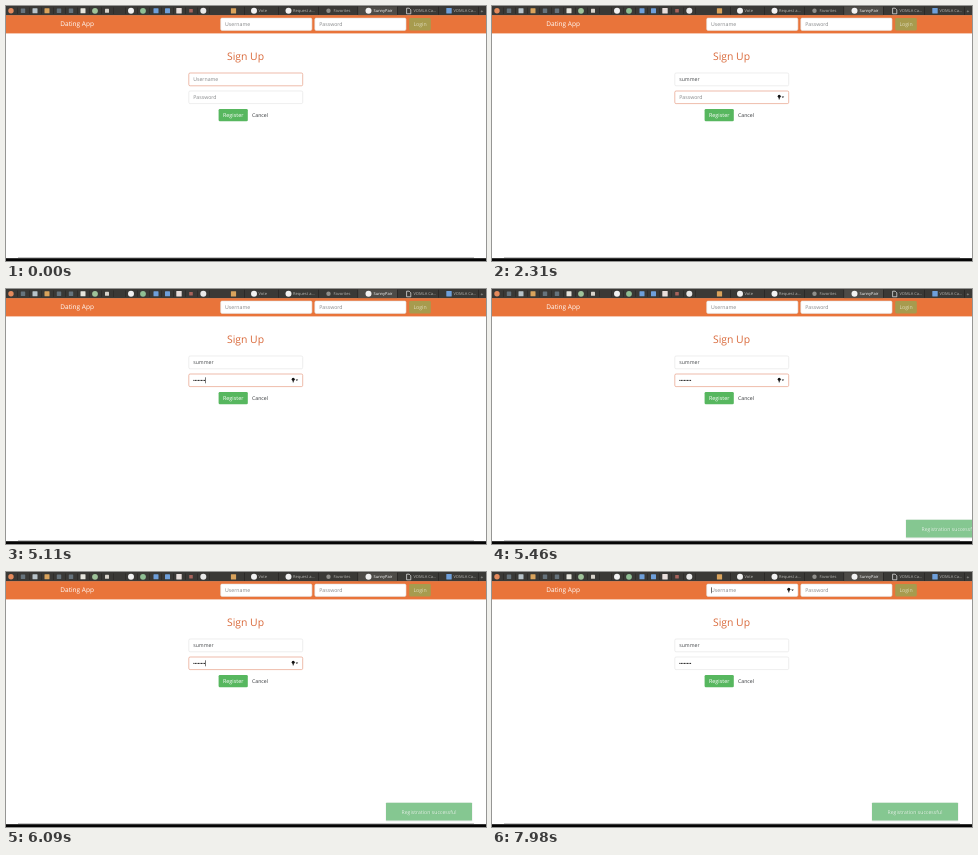
Animation, 480 px wide and 255 px high, one loop 8000 ms. Source, as an HTML page:

```html
<!DOCTYPE html>
<html lang="en">
<head>
<meta charset="utf-8">
<title>Sign Up</title>
<style>
  html, body { margin: 0; width: 100%; height: 100%; overflow: hidden; background: #fff; }
  svg { display: block; width: 480px; height: 255px; }
  text { font-family: "Open Sans", "Noto Sans", sans-serif; font-size: 5.2px; text-rendering: geometricPrecision; white-space: pre; }
  .hint { fill: #858789; }
  .typed { fill: #45484b; }
  .tab { font-size: 4px; fill: #b9b8b4; }
</style>
</head>
<body>
<svg id="stage" viewBox="0 0 480 255" xmlns="http://www.w3.org/2000/svg"></svg>
<script>
const NS = 'http://www.w3.org/2000/svg';
const stage = document.getElementById('stage');
const LOOP = 8000;

function add(tag, attrs, parent = stage) {
  const el = document.createElementNS(NS, tag);
  for (const k in attrs) el.setAttribute(k, attrs[k]);
  parent.appendChild(el);
  return el;
}
const rect = (x, y, width, height, fill, more = {}, parent) =>
  add('rect', { x, y, width, height, fill, ...more }, parent);
const circle = (cx, cy, r, fill, parent) => add('circle', { cx, cy, r, fill }, parent);
function label(x, y, str, attrs = {}, parent) {
  const el = add('text', { x, y, ...attrs }, parent);
  el.textContent = str;
  return el;
}
const show = (el, on) => el.setAttribute('visibility', on ? 'visible' : 'hidden');
const clamp = v => Math.max(0, Math.min(1, v));

function drawTabs() {
  rect(0, 0, 480, 9.6, '#3a3936');
  rect(352, 0.4, 39, 9.2, '#4d4b47');
  for (let x = 11.3; x < 206; x += 12) rect(x, 1.5, 0.5, 6.5, '#24231f');
  for (const x of [238, 272, 312, 351.5, 391, 432, 472]) rect(x, 0.8, 0.6, 8, '#22211e');

  const square = (x, fill, s = 5) => rect(x - s / 2, 4.8 - s / 2, s, s, fill, { rx: 0.5 });
  const disc = (x, fill, r = 2.9) => circle(x, 4.8, r, fill);
  disc(5, '#e58a5c', 2.7);
  for (const x of [17, 53, 65]) square(x, '#66737c', 4.4);
  square(29, '#b8c3c9');
  square(41, '#d9a35c');
  square(77, '#e6e5dd');
  disc(89, '#9fc39a');
  square(101, '#d8d3cb', 4);
  disc(125, '#f2f2f2', 3);
  disc(137, '#8fbf94');
  square(150, '#6e9fda');
  square(161.5, '#6e9fda');
  square(173, '#e8dfdc', 5.4);
  square(185, '#a8645c', 3.6);
  disc(197.3, '#e9e9e9', 3);
  square(227.5, '#d9a35c', 5.2);
  disc(248, '#f2f2f2', 3);
  disc(282.5, '#f2f2f2', 3);
  disc(322.5, '#8f8e8a', 2.2);
  disc(362.5, '#f2f2f2', 3);
  add('path', { d: 'M400.6 2.2h2.6l1.6 1.6v4h-4.2z', fill: 'none', stroke: '#eee', 'stroke-width': 0.7 });
  square(443, '#6e9fda', 5.4);

  const names = [[252.5, 'Vote'], [287, 'Request a…'], [327.5, 'Favorites'],
    [407.5, 'VOMLA Ca…'], [447.5, 'VOMLA Ca…']];
  for (const [x, str] of names) label(x, 6.3, str, { class: 'tab' });
  label(367.5, 6.3, 'SunnyPair', { class: 'tab', style: 'fill:#fff' });
  label(474.6, 6.6, '+', { class: 'tab', style: 'font-size:5px' });
}

function field(x, y, w, h, hint) {
  const box = rect(x, y, w, h, '#fff', { rx: 1.3, stroke: '#e3e3e3', 'stroke-width': 0.6 });
  const base = y + h / 2 + 1.85;
  return {
    box,
    hint: label(x + 4.4, base, hint, { class: 'hint' }),
    text: label(x + 4.4, base, '', { class: 'typed' }),
    caret: rect(x + 4.4, y + h / 2 - 3, 0.6, 6, '#222')
  };
}

// password-manager key with its drop-down arrow
function keyIcon(x, y) {
  const g = add('g', { transform: `translate(${x} ${y})` });
  circle(0, -0.8, 1.5, '#111', g);
  rect(-0.5, 0, 1, 2.4, '#111', {}, g);
  add('path', { d: 'M2.4 -.5h2.6l-1.3 1.4z', fill: '#222' }, g);
  return g;
}

drawTabs();
rect(0, 9.2, 480, 18.2, '#e9743a');
label(54.3, 20.4, 'Dating App', { fill: '#fff', style: 'font-size:6.5px;font-weight:500' });
const navUser = field(214.7, 12.1, 91.2, 12.3, 'Username');
const navPass = field(308.8, 12.1, 91.2, 12.3, 'Password');
show(navPass.caret, false);
rect(403.2, 12.1, 21.6, 12.3, '#a79b4e', { rx: 1.3 });
label(414, 20.2, 'Login', { fill: '#dfdcbd', 'text-anchor': 'middle' });

label(239.5, 53.7, 'Sign Up', { fill: '#d9693a', 'text-anchor': 'middle', style: 'font-size:10.4px' });
const user = field(182.8, 67, 113.9, 12.8, 'Username');
const pass = field(182.8, 85, 113.9, 12.6, 'Password');
const dots = Array.from({ length: 8 }, (_, i) => circle(187.9 + i * 1.52, 91.4, 0.62, '#333'));
rect(212.6, 103, 29.2, 12.2, '#57b75f', { rx: 1.3 });
label(227.2, 111.1, 'Register', { fill: '#fff', 'text-anchor': 'middle', style: 'font-size:5.4px;font-weight:500' });
label(246, 111.1, 'Cancel', { fill: '#34373a' });
const passKey = keyIcon(287.2, 91);
const navKey = keyIcon(296.8, 18);

const toast = add('g', {});
rect(379.6, 230.6, 87, 19, '#000', { opacity: 0.07, rx: 1 }, toast);
rect(380, 230.8, 86, 17.8, '#85c791', { rx: 0.6 }, toast);
label(423.4, 242.2, 'Registration successful', { fill: '#5c9d69', opacity: 0.5, 'text-anchor': 'middle' }, toast);
label(423, 241.8, 'Registration successful', { fill: '#e8f5ea', 'text-anchor': 'middle' }, toast);

rect(12, 251.2, 456, 0.8, '#b9b9b9');
rect(0, 252.2, 480, 2.8, '#050505');

const NAME = 'summer';
const nameKeys = [210, 350, 560, 700, 840, 1050];
const passKeys = dots.map((_, i) => 3850 + i * 140);
const PASS_FOCUS = 1820, NAV_FOCUS = 7630, TOAST = 5340;
const typedBy = (keys, t) => keys.filter(k => t >= k).length;
const within = (t, a, b) => t >= a && t < b;

function border(f, amount) {
  const mix = (a, b) => Math.round(a + (b - a) * amount);
  f.box.setAttribute('stroke', `rgb(${mix(227, 227)},${mix(227, 143)},${mix(227, 114)})`);
}

// cubic-bezier(.175, .885, .32, 1.275): overshoots, then settles
function backOut(x) {
  const curve = (s, a, b) => 3 * (1 - s) * (1 - s) * s * a + 3 * (1 - s) * s * s * b + s * s * s;
  let lo = 0, hi = 1;
  for (let i = 0; i < 24; i++) {
    const mid = (lo + hi) / 2;
    if (curve(mid, 0.175, 0.32) < x) lo = mid; else hi = mid;
  }
  return curve(hi, 0.885, 1.275);
}

function draw(t) {
  const inPass = clamp((t - PASS_FOCUS) / 150);
  const inNav = clamp((t - NAV_FOCUS) / 150);
  border(user, 1 - inPass);
  border(pass, inPass * (1 - inNav));

  const n = typedBy(nameKeys, t);
  user.text.textContent = NAME.slice(0, n);
  show(user.hint, n === 0);
  show(user.caret, within(t, 70, 1610));
  user.caret.setAttribute('x', 187.2 + (n ? user.text.getComputedTextLength() + 0.2 : 0));

  const p = typedBy(passKeys, t);
  dots.forEach((d, i) => show(d, i < p));
  show(pass.hint, p === 0);
  show(pass.caret, within(t, PASS_FOCUS, 2310) || within(t, 2870, 3360) ||
    within(t, 3850, 5390) || within(t, 5890, 6370) || within(t, 6870, 7370));
  pass.caret.setAttribute('x', 187.2 + p * 1.52);
  show(passKey, within(t, PASS_FOCUS, NAV_FOCUS));

  show(navKey, t >= NAV_FOCUS);
  show(navUser.caret, t >= NAV_FOCUS);

  const slide = backOut(clamp((t - TOAST) / 500));
  show(toast, t >= TOAST);
  toast.setAttribute('transform', `translate(${(203 * (1 - slide)).toFixed(2)} 0)`);
}

const start = performance.now();
function tick() {
  draw((performance.now() - start) % LOOP);
  requestAnimationFrame(tick);
}
draw(0);
requestAnimationFrame(tick);
</script>
</body>
</html>
```
